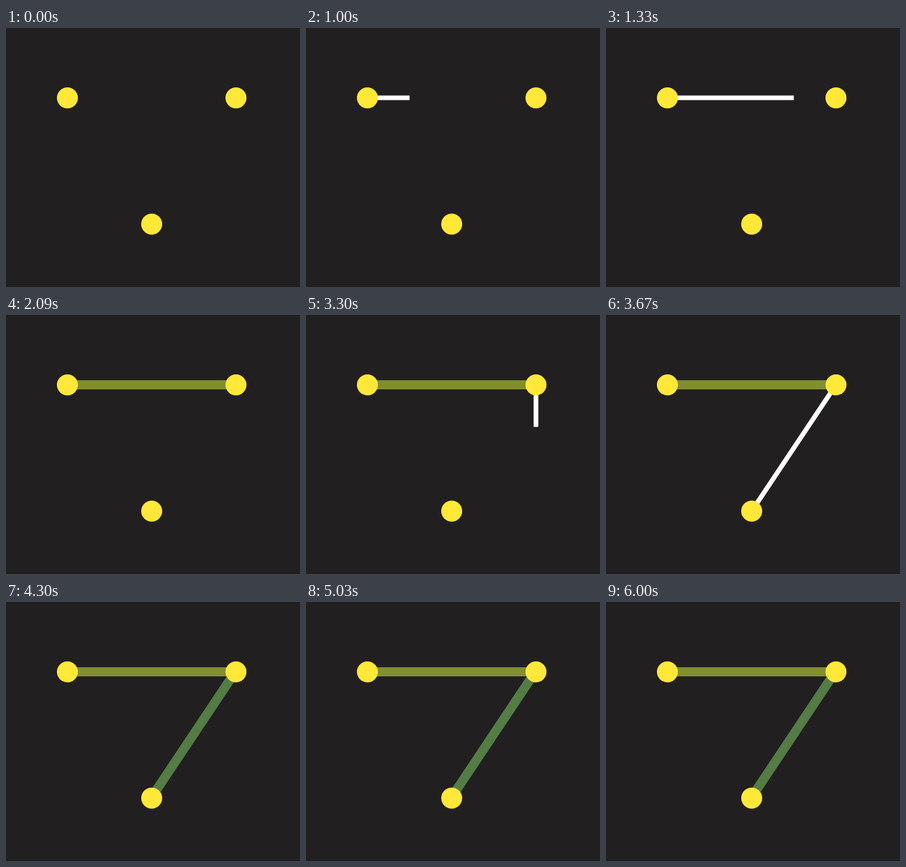
An HTML page for the animation above (6180 ms loop, 450 by 397 pixels).

```html
<!DOCTYPE html>
<html lang="en">
<head>
<meta charset="utf-8">
<title>Connecting dots</title>
<style>
  html, body { margin: 0; height: 100%; overflow: hidden; background: #221f21; }
  svg { display: block; width: 450px; height: 397px; }
</style>
</head>
<body>
<svg viewBox="0 0 450 397">
  <line id="across"/>
  <line id="down"/>
  <g fill="#ffe838">
    <circle cx="94" cy="107.1" r="16.1"/>
    <circle cx="352" cy="107.1" r="16.1"/>
    <circle cx="223" cy="300.6" r="16.1"/>
  </g>
</svg>
<script>
const LOOP = 6180;
const CELL = 64.5;

// Each stroke's tip snaps from one grid cell to the next, then the stroke locks in.
const strokes = [
  { id: 'across', x: 94, lockedX: 94, y: 107, path: [[1, 0], [2, 0], [3, 0], [4, 0]],
    start: 1000, step: 150, lock: 1970, color: '#818f2f' },
  { id: 'down', x: 352, lockedX: 351, y: 107, path: [[0, 1], [-1, 2], [-2, 3]],
    start: 3300, step: 125, lock: 4300, color: '#547c45' }
];

function setAttributes(element, attributes) {
  for (const name in attributes) element.setAttribute(name, attributes[name]);
}

function drawStroke(stroke, time) {
  const count = Math.floor((time - stroke.start) / stroke.step);
  const [dx, dy] = count < 0 ? [0, 0] : stroke.path[Math.min(count, stroke.path.length - 1)];
  const locked = time >= stroke.lock;
  const x = locked ? stroke.lockedX : stroke.x;
  setAttributes(document.getElementById(stroke.id), {
    x1: x,
    y1: stroke.y,
    x2: x + dx * CELL,
    y2: stroke.y + dy * CELL,
    stroke: locked ? stroke.color : '#fff',
    'stroke-width': locked ? 14 : 7.2,
    visibility: count < 0 ? 'hidden' : 'visible'
  });
}

const origin = performance.now();

function render() {
  const time = Math.max(0, performance.now() - origin) % LOOP;
  strokes.forEach(stroke => drawStroke(stroke, time));
  requestAnimationFrame(render);
}

render();
</script>
</body>
</html>
```
